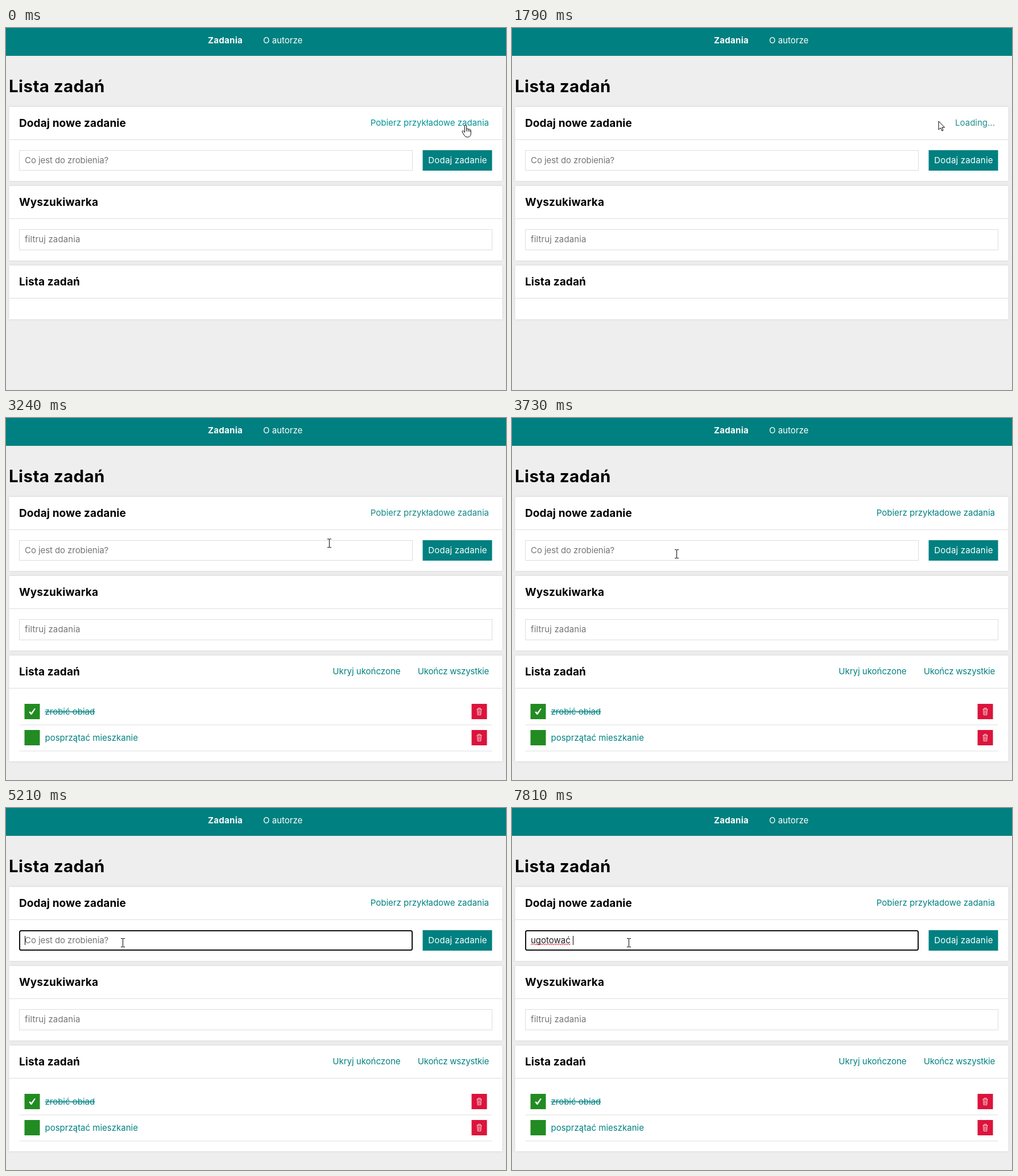
An HTML page for the animation above (8 s loop, 879 px wide and 637 px high).

```html
<!DOCTYPE html>
<html lang="pl">
<head>
<meta charset="utf-8">
<title>Lista zadań</title>
<style>
  html, body { margin: 0; width: 100%; height: 100%; overflow: hidden; background: #eee; }
  svg { display: block; width: 879px; height: 637px; }
  text { font: 400 15px Inter, "Open Sans", sans-serif; white-space: pre; }
  .card { fill: #fff; filter: drop-shadow(0 0 2px #d4d4d4); }
  .rule { fill: #ddd; }
  .field { fill: #fff; stroke: #ddd; }
  .teal, .link { fill: teal; }
  .white { fill: #fff; }
  .hint { fill: #757575; }
  .end { text-anchor: end; }
  .mid { text-anchor: middle; }
  .done { text-decoration: line-through; }
  .tick { fill: #228b22; }
  .bin { fill: #dc143c; }
  .can { fill: none; stroke: #f8d3da; }
  .pointer { fill: #fff; stroke: #000; stroke-linejoin: round; }
  h1, .h1 { font-size: 29.5px; font-weight: 700; letter-spacing: .4px; }
  .h2 { font-size: 19px; font-weight: 700; letter-spacing: .1px; }
  .active { font-weight: 700; letter-spacing: .3px; }
</style>
</head>
<body>
<svg viewBox="0 0 879 637">
  <defs>
    <g id="trash">
      <rect class="bin" width="27" height="27"/>
      <path class="can" d="M9 9.5H18M11.5 9V7.5H15.5V9M10 10L10.7 19.5H16.3L17 10M12.3 11V18M14.7 11V18"/>
    </g>
  </defs>

  <rect class="teal" width="879" height="49"/>
  <text class="white active" x="355" y="27">Zadania</text>
  <text class="white" x="452" y="27">O autorze</text>
  <text class="h1" x="5" y="113">Lista zadań</text>

  <rect class="card" x="5.5" y="139" width="867" height="130"/>
  <rect class="rule" x="5.5" y="196" width="867" height="1"/>
  <text class="h2" x="23" y="174">Dodaj nowe zadanie</text>
  <text class="link end" id="fetch" x="849" y="172"></text>
  <rect class="field" id="field" x="23.5" y="215.5" width="691" height="35"/>
  <text id="entry" x="33" y="238"></text>
  <path id="squiggle" fill="none" stroke="#e0202a"/>
  <rect id="caret" y="225" width="1" height="16"/>
  <rect class="teal" x="732.5" y="215" width="122" height="36"/>
  <text class="white mid" x="794" y="238" letter-spacing=".2">Dodaj zadanie</text>

  <rect class="card" x="5.5" y="278" width="867" height="131"/>
  <rect class="rule" x="5.5" y="335" width="867" height="1"/>
  <text class="h2" x="23" y="313">Wyszukiwarka</text>
  <rect class="field" x="23.5" y="354.5" width="831" height="36"/>
  <text class="hint" x="33" y="377" letter-spacing=".14">filtruj zadania</text>

  <rect class="card" id="list" x="5.5" y="418" width="867" height="94.5"/>
  <rect class="rule" x="5.5" y="475" width="867" height="1"/>
  <text class="h2" x="23" y="453">Lista zadań</text>
  <g id="tasks">
    <text class="link end" x="693.5" y="451">Ukryj ukończone</text>
    <text class="link end" x="849" y="451" letter-spacing="-.18">Ukończ wszystkie</text>
    <rect class="tick" x="32.5" y="503" width="27" height="27"/>
    <path class="white" d="M40.3 517.6L42.3 516.2L44.4 518.4L50 510.9L51.9 511.5L45.3 522H43.6Z"/>
    <text class="link done" x="68.5" y="522">zrobić obiad</text>
    <use href="#trash" x="818.5" y="503"/>
    <rect class="rule" x="23.5" y="539.5" width="831" height="1"/>
    <rect class="tick" x="32.5" y="549" width="27" height="27"/>
    <text class="link" x="68.5" y="568">posprzątać mieszkanie</text>
    <use href="#trash" x="818.5" y="549"/>
    <rect class="rule" x="23.5" y="585.5" width="831" height="1"/>
  </g>

  <circle id="halo" r="10.5" fill="#ff3" fill-opacity=".75"/>
  <g id="mouse">
    <path id="hand" class="pointer" d="M-1.7 1.2C-1.7 -.7 1.7 -.7 1.7 1.2V7C2.2 5.8 4.5 6 4.6 7.5C5.2 6.4 7.3 6.8 7.4 8.3C8.2 7.6 9.3 8.2 9.3 9.6V14.5C9.3 18.5 7 21 3.5 21C0 21 -1.3 19.8 -2.8 17L-6 11.8C-6.6 10 -4.5 9.2 -3.4 10.6L-1.7 12.6ZM1.7 7V11M4.6 7.5V11.2M7.4 8.3V11.5"/>
    <path id="arrow" class="pointer" d="M0 0V15L3.5 11.8L5.8 17L8 16L5.8 11H10.5Z"/>
    <g id="beam" fill="none">
      <path d="M-3 -7.5H3M-3 7.5H3M0 -7V7" stroke="#fff" stroke-width="2.5"/>
      <path d="M-3.5 -7.5H-1Q0 -7.5 0 -6.5Q0 -7.5 1 -7.5H3.5M-3.5 7.5H-1Q0 7.5 0 6.5Q0 7.5 1 7.5H3.5M0 -7V7" stroke="#000"/>
    </g>
  </g>
</svg>
<script>
const LOOP = 8000, TICK = 70;
const PRESS = 1720, LOADING = 1790, LOADED = 2830, FOCUS = 4140, CHECKED = 7810;
const BURSTS = [0, 1310, PRESS, LOADED, 3660, FOCUS];
const WORD = 'ugotować ';
const KEYS = [5280, 6030, 6160, 6490, 6620, 6880, 7080, 7540, 7740];
const CARET_OFF = [[4680, 5210], [5760, 6030]];
// time, x, y of the pointer's hot spot
const PATH = [
  [0, 808, 171], [1240, 808, 171], [1380, 776, 167], [1520, 750, 164],
  [2830, 750, 164], [2900, 741, 170], [3040, 672, 198], [3240, 524, 230],
  [3590, 340, 238], [3940, 214, 241], [4140, 198, 239], [4280, 205.5, 237]
];
const TEAL = [0, 128, 128], HOVER = [0, 146, 150], OFF = [221, 221, 221];

const el = {};
document.querySelectorAll('svg [id]').forEach(n => el[n.id] = n);
const show = (node, on) => node.style.display = on ? '' : 'none';
const set = (node, attrs) => Object.entries(attrs).forEach(([k, v]) => node.setAttribute(k, v));
const within = (t, a, b) => t >= a && t < b;
const mix = (a, b, k) => `rgb(${a.map((v, i) => Math.round(v + (b[i] - v) * k))})`;

function stepped(t) {
  const start = BURSTS.filter(b => b <= t).pop();
  return start + Math.floor((t - start) / TICK) * TICK;
}

function pointerAt(t) {
  const i = PATH.findIndex(p => p[0] > t);
  if (i < 0) return PATH[PATH.length - 1].slice(1);
  const [a, b] = [PATH[i - 1], PATH[i]];
  const k = (t - a[0]) / (b[0] - a[0]);
  return [1, 2].map(j => a[j] + (b[j] - a[j]) * k);
}

function linkColor(t) {
  const fade = start => 1 - (1 - Math.min(1, Math.max(0, (t - start) / 500))) ** 2;
  if (t < LOADING) return mix(HOVER, OFF, 0);
  return t < LOADED ? mix(TEAL, OFF, fade(1750)) : mix(OFF, TEAL, fade(LOADED));
}

function pointerKind(t, [x, y]) {
  if (within(t, LOADING, LOADED)) return 'arrow';
  if (y > 215 && x < 715) return 'beam';
  return y < 180 && x > 639 ? 'hand' : 'arrow';
}

function drawSquiggle(width) {
  let d = 'M33 241';
  for (let x = 2, up = true; x <= width; x += 2, up = !up) d += `L${33 + x} ${up ? 238.8 : 241}`;
  el.squiggle.setAttribute('d', d);
}

function drawEntry(t) {
  const typed = WORD.slice(0, KEYS.filter(k => k <= t).length);
  const focused = t >= FOCUS;
  el.entry.textContent = typed || 'Co jest do zrobienia?';
  set(el.entry, { fill: typed ? '#222' : '#757575', 'letter-spacing': typed ? 0 : -.08 });
  const width = typed ? el.entry.getComputedTextLength() : 0;

  set(el.caret, { x: Math.round(33 + width) });
  show(el.caret, focused && !CARET_OFF.some(([a, b]) => within(t, a, b)));
  el.field.style.cssText = focused ? 'stroke:#101010;stroke-width:2' : '';
  set(el.field, focused
    ? { x: 24, y: 216, width: 690, height: 34, rx: 2.5 }
    : { x: 23.5, y: 215.5, width: 691, height: 35, rx: 0 });

  show(el.squiggle, t >= CHECKED);
  if (t >= CHECKED) drawSquiggle(width - 4);
}

function drawPointer(t) {
  const pos = pointerAt(t), kind = pointerKind(t, pos);
  set(el.mouse, { transform: `translate(${pos})` });
  ['hand', 'arrow', 'beam'].forEach(k => show(el[k], k === kind));
  set(el.halo, { cx: pos[0] - 1.5, cy: pos[1] - .5 });
  show(el.halo, within(t, PRESS, PRESS + TICK) || within(t, FOCUS, FOCUS + TICK));
}

function render() {
  const t = performance.now() % LOOP, s = stepped(t);
  const loaded = t >= LOADED;
  el.fetch.textContent = within(t, LOADING, LOADED) ? 'Loading...' : 'Pobierz przykładowe zadania';
  el.fetch.style.fill = linkColor(s);
  set(el.list, { height: loaded ? 186 : 94.5 });
  show(el.tasks, loaded);
  drawEntry(t);
  drawPointer(s);
  requestAnimationFrame(render);
}
render();
</script>
</body>
</html>
```
